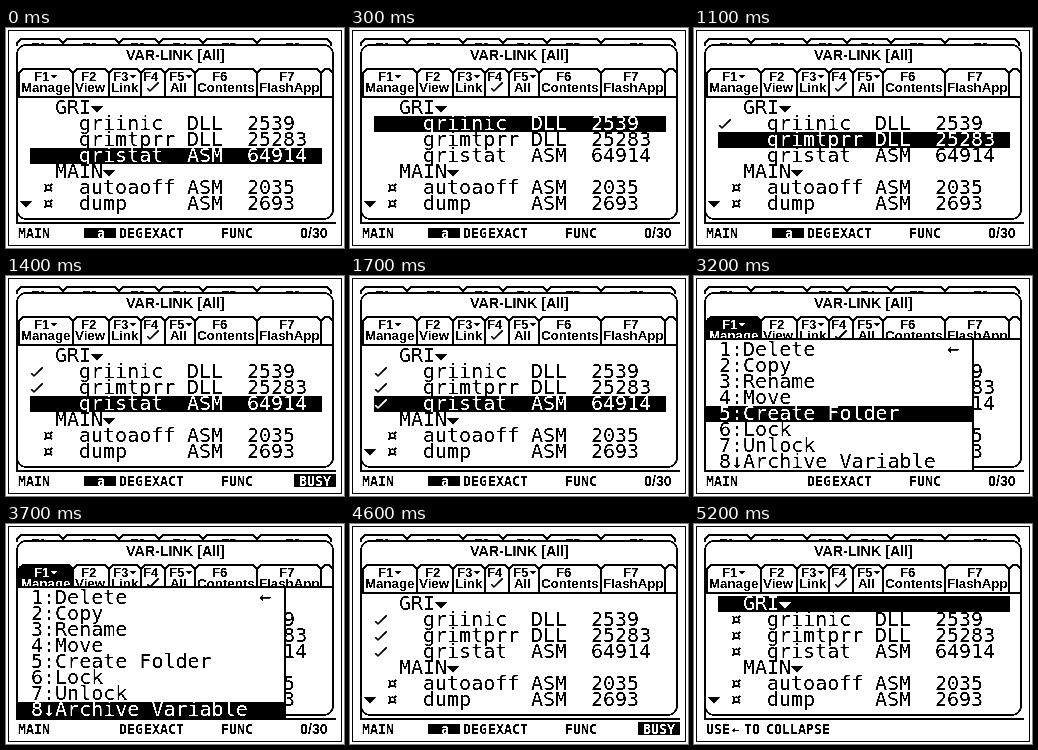
Animation of 338x220 px, one loop 6500 ms. Source, as an HTML page with a canvas:

```html
<!DOCTYPE html>
<html lang="en">
<head>
<meta charset="utf-8">
<title>Calculator variable list</title>
<style>
html, body { margin: 0; width: 100%; height: 100%; overflow: hidden; background: #fff; }
canvas { display: block; filter: grayscale(1) contrast(6); }
</style>
</head>
<body>
<canvas id="screen" width="338" height="220"></canvas>
<script>
const ctx = document.getElementById('screen').getContext('2d');
const LOOP = 6500;
const LIST = '20px "DejaVu Sans Mono", monospace';
const TITLE = 'bold 14.3px "Liberation Sans", Arial, sans-serif';
const LABEL = 'bold 13.3px "Liberation Sans", Arial, sans-serif';
const STATUS = 'bold 13.3px "DejaVu Sans Mono", monospace';

// [start, selected row, checked rows, busy]
const listSteps = [
  [0, 3, 0], [100, 2, 0], [200, 1, 0, 1], [300, 1, 0],
  [900, 1, 0, 1], [1000, 1, 1], [1100, 2, 1], [1200, 2, 1, 1],
  [1300, 2, 2], [1400, 3, 2, 1], [1500, 3, 2], [1600, 3, 2, 1],
  [1700, 3, 3], [4600, -1, 3, 1]
];
const menuStarts = [2300, 2800, 2900, 3100, 3200, 3400, 3500, 3700];
const menu = ['1:Delete', '2:Copy', '3:Rename', '4:Move', '5:Create Folder',
  '6:Lock', '7:Unlock', '8↓Archive Variable'];
const rows = [
  ['GRI'], ['griinic', 'DLL', '2539'], ['grimtprr', 'DLL', '25283'],
  ['gristat', 'ASM', '64914'], ['MAIN'], ['autoaoff', 'ASM', '2035'],
  ['dump', 'ASM', '2693']
];
// [left edge, key, key x, label, label x, has submenu]
const tabs = [
  [12, 'F1', 28, 'Manage', 15, 1], [66, 'F2', 75, 'View', 69],
  [102, 'F3', 107, 'Link', 105, 1], [134, 'F4', 137, '', 0],
  [158, 'F5', 163, 'All', 164, 1], [188, 'F6', 206, 'Contents', 191],
  [250, 'F7', 273, 'FlashApp', 253], [314, '', 0, '', 0], [326]
];

function box(x, y, w, h, color = '#000') {
  ctx.fillStyle = color;
  ctx.fillRect(x, y, w, h);
}

function text(str, x, y, font = LIST, color = '#000') {
  ctx.font = font;
  ctx.fillStyle = color;
  ctx.fillText(str, x, y);
}

function line(color, ...points) {
  ctx.strokeStyle = color;
  ctx.beginPath();
  for (let i = 0; i < points.length; i += 2) ctx.lineTo(points[i], points[i + 1]);
  ctx.stroke();
}

function triangle(x, y, w, color = '#000') {
  ctx.fillStyle = color;
  ctx.beginPath();
  ctx.moveTo(x, y);
  ctx.lineTo(x + w, y);
  ctx.lineTo(x + w / 2, y + w / 2 + 1);
  ctx.fill();
}

function check(x, y, color) {
  ctx.lineWidth = 1.5;
  line(color, x, y + 6, x + 3, y + 9, x + 12, y);
  ctx.lineWidth = 2;
}

function roundTop(x, right, y, bottom) {
  line('#000', x + 1, bottom, x + 1, y + 5, x + 5, y + 1,
    right - 3, y + 1, right + 1, y + 5, right + 1, bottom);
}

function drawFrame() {
  box(0, 0, 338, 220, '#fff');
  ctx.strokeStyle = '#000';
  ctx.lineWidth = 1;
  ctx.strokeRect(2.5, 2.5, 333, 215);
  ctx.lineWidth = 2;
  const edges = [10, 56, 112, 152, 196, 250, 324];
  for (let i = 1; i < edges.length; i++) {
    roundTop(edges[i - 1], edges[i], 10, 18);
    text('F' + i, (edges[i - 1] + edges[i]) / 2 - 8, 24, LABEL);
  }
  box(10, 184, 2, 10);
  ctx.beginPath();
  ctx.roundRect(11, 17, 316, 174, 9);
  ctx.fillStyle = '#fff';
  ctx.fill();
  ctx.stroke();
  box(10, 194, 320, 2);
}

function drawTabs(open) {
  ctx.save();
  ctx.beginPath();
  ctx.rect(10, 38, 318, open ? 24 : 30);
  ctx.clip();
  for (let i = 0; i < tabs.length - 1; i++) {
    const [x, key, keyX, label, labelX, sub] = tabs[i];
    const active = open && i === 0;
    const color = active ? '#fff' : '#000';
    roundTop(x, tabs[i + 1][0], 40, 68);
    if (active) box(13, 42, 53, 26);
    text(key, keyX, 53, LABEL, color);
    text(label, labelX, 64, LABEL, color);
    if (sub) triangle(keyX + 17, 47, 6, color);
    if (key === 'F4') check(141, 54, color);
  }
  ctx.restore();
  box(12, open ? 62 : 68, 314, 2);
}

function drawList(sel, checked, busy) {
  rows.forEach(([name, type, size], i) => {
    const y = 72 + 16 * i, base = y + 14;
    const color = i === sel ? '#fff' : '#000';
    if (i === sel) box(24, y, 292, 16);
    if (!type) {
      text(name, 49, base, LIST, color);
      triangle(49 + name.length * 12, y + 6, 12, color);
      return;
    }
    text(name, 73, base, LIST, color);
    text(type, 181, base, LIST, color);
    text(size, 241, base, LIST, color);
    if (i > 4 || checked === 'archived') text('¤', 36, base, 'bold ' + LIST, color);
    else if (i <= checked) check(25, y + 3, color);
  });
  if (!busy) triangle(14, 173, 12);
}

function drawMenu(sel) {
  box(10, 62, 270, 134);
  box(12, 64, 266, 130, '#fff');
  menu.forEach((item, i) => {
    const y = 66 + 16 * i;
    const color = i === sel ? '#fff' : '#000';
    if (i === sel) box(12, i ? y : 64, 266, i ? 16 : 18);
    text(item, 25, y + 14, LIST, color);
    if (i === 0) text('←', 253, y + 13, LIST, color);
  });
}

function drawStatus(alpha, busy) {
  const put = (str, x, color) => text(str, x, 210, STATUS, color);
  put('MAIN', 12);
  put('DEG', 113);
  put('EXACT', 138);
  put('FUNC', 215);
  if (alpha) {
    box(78, 200, 32, 10);
    put('a', 91, '#fff');
  }
  if (busy) {
    box(288, 198, 42, 13);
    put('BUSY', 293, '#fff');
  } else text('0/30', 294, 210, TITLE);
}

function draw(t) {
  const item = t < 4600 ? menuStarts.findLastIndex(start => t >= start) : -1;
  const open = item >= 0;
  const [, sel, checked, busy] = listSteps.findLast(step => t >= step[0]);
  const done = t >= 5200;

  drawFrame();
  if (t < 5000 || t >= 5100) {
    text('VAR-LINK [All]', 120, 32, TITLE);
    drawTabs(open);
  }
  if (done) drawList(0, 'archived');
  else if (t < 5000) drawList(open ? -1 : sel, checked, busy && t < 4600);
  if (open) drawMenu(item);

  if (done) {
    text('USE', 12, 210, STATUS);
    text('←', 38, 210, STATUS);
    text('TO', 50, 210, STATUS);
    text('COLLAPSE', 72, 210, STATUS);
  } else if (item === 0) {
    text('TYPE OR USE ←→↑↓ + [ENTER] OR [ESC]', 12, 210, STATUS);
  } else drawStatus(!open, busy);
}

function tick() {
  draw(performance.now() % LOOP);
  requestAnimationFrame(tick);
}
tick();
</script>
</body>
</html>
```
